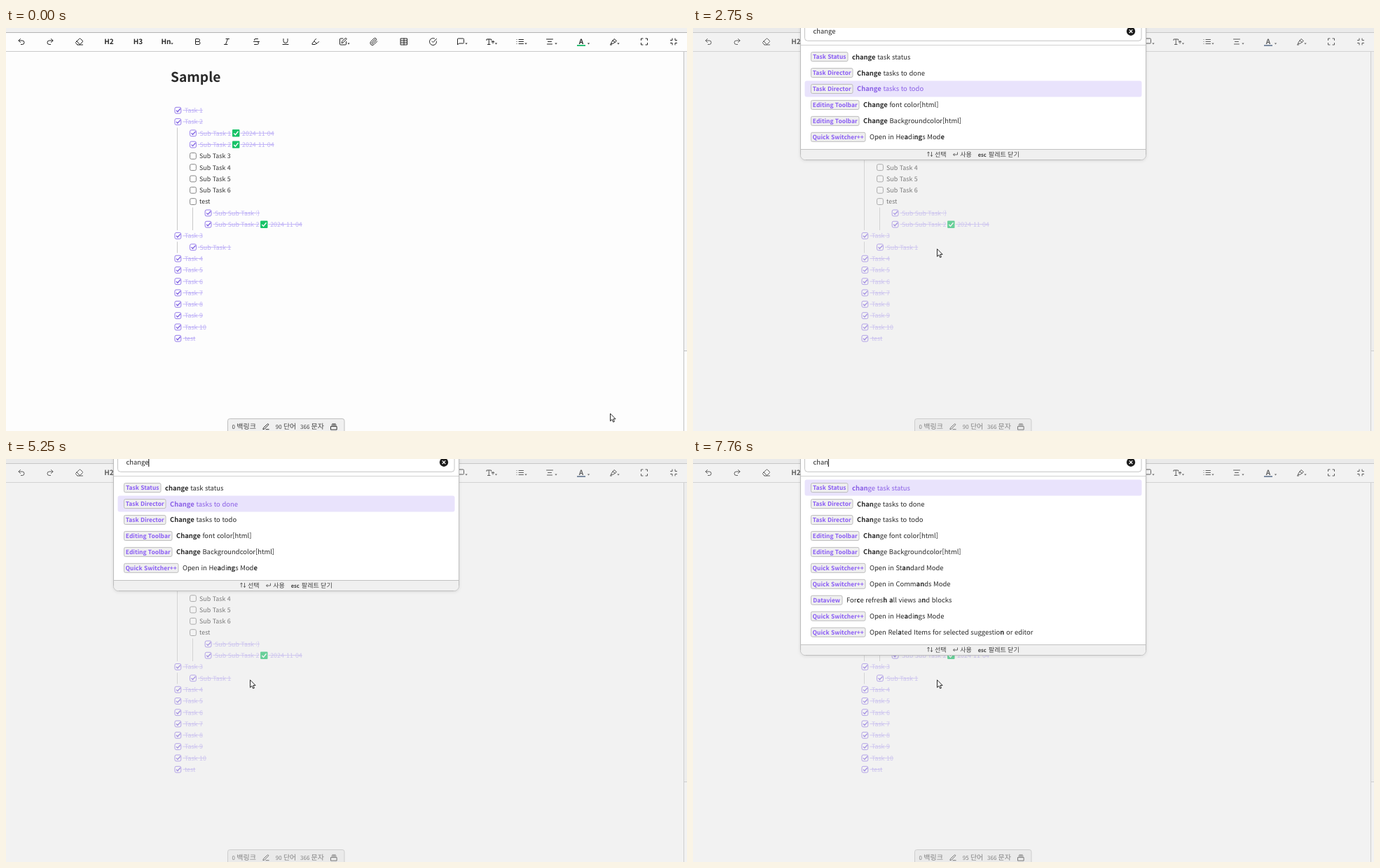
These frames come from a looping animation (972x576 px, 8 s). An HTML page:

```html
<!DOCTYPE html>
<html lang="ko">
<head>
<meta charset="utf-8">
<title>Command palette</title>
<style>
html, body { margin: 0; width: 100%; height: 100%; overflow: hidden; background: #fdfdfd; }
svg { display: block; }
text { font: 9.43px "Noto Sans CJK KR", "Noto Sans CJK JP", "Noto Sans", sans-serif; fill: #2a2a2a; white-space: pre; text-rendering: geometricPrecision; }
.ko { font-size: 11.45px; }
.b { font-weight: 700; }
.mid { text-anchor: middle; }
.icon { fill: none; stroke: #222; stroke-width: 2; stroke-linecap: round; stroke-linejoin: round; }
.tri { fill: #333; }
#tools text { font-size: 10px; font-weight: 700; }
#tools.dim { opacity: .72; }
.tint { stroke: #14b866; stroke-width: 1.8; }
.dim .tint { stroke: #3d5578; }
text.title { font-size: 19.2px; font-weight: 700; }
text.task { font-size: 8.9px; fill: #333; }
text.done { fill: #bcaef6; text-decoration: line-through; }
.box { fill: #fff; stroke: #858585; }
.box.on { stroke: #9379ea; }
.tick { fill: none; stroke: #7b5ce0; stroke-width: 1.3; }
.guide { stroke: #c9c9c9; }
text.stat { font-size: 8px; fill: #444; }
.stat .ko { font-size: 10px; }
.panel { fill: #fff; stroke: #bdbdbd; filter: drop-shadow(0 1px 2px rgba(0, 0, 0, .1)); }
.hl { fill: #e9e3fc; }
text.sel { fill: #8a5fe6; }
.tag { fill: #efefef; stroke: #bdbdbd; }
text.tagname { font-size: 8.45px; font-weight: 700; fill: #8a5cf5; }
.key { fill: #e8e2fc; stroke: #a792ef; }
text.keyname { font-size: 7.7px; fill: #7355d8; stroke: #7355d8; stroke-width: .15px; }
text.hint { font-size: 7.6px; fill: #444; }
.hint .ko { font-size: 9.1px; }
text.ghost { fill: #777; }
</style>
</head>
<body>
<svg width="972" height="576" viewBox="0 0 972 576">
  <defs><clipPath id="list"><rect x="154" y="24" width="492" height="411"/></clipPath></defs>
  <rect width="972" height="576" fill="#fdfdfd"/>
  <rect width="972" height="6" fill="#f0f0f0"/>
  <path d="M0 6.5H972" stroke="#b4b4b4"/>
  <path d="M0 33.5H972" stroke="#c9c9c9"/>
  <rect x="968" y="34" width="4" height="427" fill="#f4f4f4"/>
  <path d="M967.5 34V576M967 461.5h5" stroke="#c0c0c0" fill="none"/>
  <g id="doc"></g>
  <path id="caret" d="M319.5 307v14" stroke="#111"/>
  <rect id="cover" width="972" height="576" fill="#e2e2e2" opacity=".4"/>
  <g id="tools"></g>
  <g id="palette"></g>
  <path id="typing" stroke="#111"/>
  <path id="arrow" d="M0 0V10.8L2.5 8.5 4.2 12.2 5.9 11.5 4.3 7.8H7.6Z" fill="#fff" stroke="#111" stroke-width=".9"/>
  <path id="beam" d="M347 310.5h5M347 321.5h5M349.5 310.5v11" fill="none" stroke="#222"/>
</svg>
<script>
const $ = id => document.getElementById(id);
const rich = s => s.replace(/[가-힣]+/g, '<tspan class="ko">$&</tspan>')
  .replace(/\*(.+?)\*/g, '<tspan class="b">$1</tspan>');
const text = (x, y, s, cls = '') => `<text x="${x}" y="${y}" class="${cls}">${rich(s)}</text>`;
const rect = (x, y, w, h, cls, r = 2) =>
  `<rect x="${x}" y="${y}" width="${w}" height="${h}" rx="${r}" class="${cls}"/>`;
const icon = (x, y, d, k = .5) =>
  `<path class="icon" transform="translate(${x - 12 * k} ${y - 12 * k}) scale(${k})" d="${d}"/>`;

// Toolbar
const marker = 'M9 11l-6 6v3h9l3-3M22 12l-4.6 4.6a2 2 0 0 1-2.8 0l-5.2-5.2a2 2 0 0 1 0-2.8L14 4';
const tools = [
  [22, 'M9 14 4 9l5-5M4 9h10.5a5.5 5.5 0 0 1 0 11H11'],
  [63, 'M15 14l5-5-5-5M20 9H9.5a5.5 5.5 0 0 0 0 11H13'],
  [104.5, 'M7 21l-4.3-4.3c-1-1-1-2.5 0-3.4l9.6-9.6c1-1 2.5-1 3.4 0l5.6 5.6c1 1 1 2.5 0 3.4L13 21M22 21H7M5 11l9 9'],
  [273.5, 'M6 12h9a4 4 0 0 1 0 8H7a1 1 0 0 1-1-1V5a1 1 0 0 1 1-1h7a4 4 0 0 1 0 8'],
  [315, 'M19 4h-9M14 20H5M15 4 9 20'],
  [357.5, 'M16 4H9a3 3 0 0 0-2.8 4M14 12a4 4 0 0 1 0 8H6M4 12h16'],
  [399, 'M6 4v6a6 6 0 0 0 12 0V4M4 20h16'],
  [441.5, marker],
  [481, 'M12 3H5a2 2 0 0 0-2 2v14a2 2 0 0 0 2 2h14a2 2 0 0 0 2-2v-7M18.4 2.6a2.1 2.1 0 0 1 3 3L12 15l-4 1 1-4Z'],
  [525, 'M21.4 11l-9.2 9.2a6 6 0 0 1-8.5-8.5l8.6-8.6a4 4 0 1 1 5.7 5.7l-8.6 8.5a2 2 0 0 1-2.8-2.8l8.5-8.5'],
  [568, 'M3 3h18v18H3ZM3 9h18M3 15h18M12 3v18'],
  [609.5, 'M22 11v1a10 10 0 1 1-6-9.1M22 4 12 14l-3-3'],
  [649, 'M21 15a2 2 0 0 1-2 2H7l-4 4V5a2 2 0 0 1 2-2h14a2 2 0 0 1 2 2z'],
  [691, 'M2 8V5h13v3M8.5 5v15M5 20h7M17 13v-2h6v2M20 11v6'],
  [733.5, 'M9 6h13M9 12h13M9 18h13M3 6h.01M3 12h.01M3 18h.01'],
  [776, 'M21 5H3M17 12H7M19 19H5'],
  [867, 'M4 20l3-7L14 4l7 6-9 7-5 1M10 9l7 5M3 21h4'],
  [911, 'M8 3H3v5M21 8V3h-5M3 16v5h5M16 21h5v-5'],
  [953, 'M8 3v5H3M21 8h-5V3M3 16h5v5M16 21v-5h5']
];
$('tools').innerHTML = tools.map(([x, d]) => icon(x, 19.5, d)).join('') +
  text(147, 23.3, 'H2', 'mid') + text(188.5, 23.3, 'H3', 'mid') + text(228.5, 23.3, 'Hn', 'mid') +
  text(821, 22.5, 'A', 'mid') + '<path class="tint" d="M815 25h12"/>' +
  [237, 489, 657, 699.5, 742, 785, 831.5, 874].map(x => `<path class="tri" d="M${x - 1.7} 21.5h3.4l-1.7 2z"/>`).join('');

// Document
const tasks = ('Task 1|Task 2|>Sub Task 1+|>Sub Task 2+|>Sub Task 3|>Sub Task 4|>Sub Task 5|>Sub Task 6|>test|' +
  '>>Sub Sub Task :)|>>Sub Sub Task 2+|Task 3|>Sub Task 1|Task 4|Task 5|Task 6|Task 7|Task 8|Task 9|Task 10|test').split('|');

function taskRow(raw, i, allDone) {
  const level = raw.lastIndexOf('>') + 1, name = raw.replace(/[>+]/g, '');
  const cx = 245.4 + 21.6 * level, cy = 117.7 + 16.3 * i, x = cx + 9;
  const done = allDone || i < 4 || i > 8, base = cy + 3.3;
  let out = rect(cx - 4.4, cy - 4.4, 8.8, 8.8, done ? 'box on' : 'box');
  if (!done) return out + text(x, base, name, 'task');
  out += `<path class="tick" d="M${cx - 2.4} ${cy}l1.9 2 4-4.4"/>` + text(x - 2, base, '\u00a0' + name, 'task done');
  if (raw.endsWith('+')) {
    const ex = x + (level > 1 ? 70.7 : 52.2);
    out += `<rect x="${ex - 5.2}" y="${cy - 5.2}" width="10.4" height="10.4" rx="1" fill="#17c368"/>` +
      `<path d="M${ex - 3} ${cy + .3}l2.2 2.2 4-5" fill="none" stroke="#fff" stroke-width="1.4"/>` +
      text(ex + 6.4, base, '\u00a02024-11-04', 'task done');
  }
  return out;
}

function page(allDone, words) {
  return text(235, 77.2, 'Sample', 'title') +
    '<path class="guide" d="M244.5 142.5V289M266.5 256.5V289M244.5 305.5V321.5"/>' +
    tasks.map((s, i) => taskRow(s, i, allDone)).join('') +
    '<rect x="316.5" y="558.5" width="166.5" height="24" rx="3" fill="#f0f0f0" stroke="#bfbfbf"/>' +
    text(322.6, 573, '0 백링크', 'stat') + text(384.8, 573, words + ' 단어', 'stat') + text(420, 573, '366 문자', 'stat') +
    icon(371, 570, 'M12 20h9M16.5 3.5a2.1 2.1 0 0 1 3 3L7 19l-4 1 1-4Z', .46) +
    icon(468, 570, 'M7 3h10M5 7h14M3 11h18v10H3Z', .46);
}

// Palette: rows are "plugin|label|shortcuts", with *matched* letters
const tagWidth = { 'Task Status': 53, 'Task Director': 60, 'Editing Toolbar': 69, 'Omnisearch': 56, 'Reminder': 47, 'Dataview': 45, 'Quick Switcher++': 78 };
const keyWidth = { 'F2': 19, 'Ctrl + Tab': 45, 'Ctrl + Page Down': 72, 'Ctrl + Shift + Tab': 70, 'Ctrl + Page Up': 61, 'Ctrl + W': 38, 'Win + Shift + Enter': 77 };
const QS = 'Quick Switcher++|Open ';
const commands = ['|현재 파일 저장|Ctrl + S', '|고정핀 켜기/끄기', '|오른쪽 분할', '|아래쪽 분할', '|스탭 탭 전환',
  '|파일 제목 편집|F2', '|파일 경로 복사', '|Feldovan URI 복사', '|PDF로 내보내기', '|현재 탭을 새 창에서 열기',
  '|현재 탭을 새 창으로 이동', '|Go to next tab|Ctrl + Page Down,Ctrl + Tab', '|Go to tab #1|Ctrl + 1',
  '|Go to last tab|Ctrl + 9', '|Go to previous tab|Ctrl + Page Up,Ctrl + Shift + Tab', '|새 탭|Ctrl + T', '|활성 탭 닫기|Ctrl + W'];
const best = ['Task Status|change task status', 'Task Director|Change tasks to done', 'Task Director|Change tasks to todo',
  'Editing Toolbar|Change font color[html]', 'Editing Toolbar|Change Backgroundcolor[html]'];
const cha = ['Omnisearch|V*a*ult search', 'Reminder|Toggle *ch*ecklist st*a*tus|Win + Shift + Enter',
  'Editing Toolbar|Toggle *ch*ecklist st*a*tus', 'Omnisearch|In-file se*a*rch', '|*C*lose t*h*is t*a*b group',
  'Dataview|For*c*e refres*h* *a*ll views and blocks', 'Task Director|S*h*ow p*a*ge todo summary',
  'Dataview|Drop all *c*ac*h*ed file met*a*data', QS + 'Rel*a*ted Items for the active editor',
  QS + 'Rel*a*ted Items for selected suggestion or editor', QS + 'in V*a*ults Mode', QS + 'in St*a*ndard Mode', QS + 'in He*a*dings Mode'];
const others = {
  ch: cha.map(s => s.replace(/\*a\*/g, 'a')),
  cha,
  chan: [QS + 'in St*an*dard Mode', QS + 'in Comm*an*ds Mode', 'Dataview|For*c*e refres*h* *a*ll views a*n*d blocks',
    QS + 'in He*a*di*n*gs Mode', QS + 'Rel*a*ted Items for selected suggestio*n* or editor'],
  chang: [QS + 'in He*a*di*ng*s Mode'],
  change: [QS + 'in He*a*di*ng*s Mod*e*']
};
const thumbEnd = { '': 95, ch: 300, cha: 350 };
const caretX = [171.5, 176.5, 182, 187.5, 193.3, 198.6, 203.8];

function rowsFor(q) {
  if (!q) return commands;
  const mark = s => s.replace(new RegExp('\\|(' + q + ')', 'i'), '|*$1*');
  return best.map(mark).concat(others[q]);
}

function palette(q, sel) {
  const thumb = thumbEnd[q];
  let y = 29.6, rows = '';
  rowsFor(q).forEach((row, i) => {
    const [tag, label, keys] = row.split('|'), h = keys ? 25.8 : 22.95, cy = y + h / 2;
    let x = 168, right = 623;
    if (i === sel) rows += rect(159.5, y, thumb ? 472.5 : 481, h, 'hl', 3);
    if (tag) {
      const w = tagWidth[tag];
      rows += rect(168.5, cy - 6.5, w - .5, 13, 'tag') + text(168 + w / 2 + .2, cy + 3.1, tag, 'tagname mid');
      x += w + 6;
    }
    rows += text(x, cy + 3.5, label, i === sel ? 'sel' : '');
    for (const key of keys ? keys.split(',') : []) {
      const w = keyWidth[key] || 36;
      rows += rect(right - w + .5, cy - 7.4, w - 1, 15.4, 'key') + text(right - w / 2, cy + 3, key, 'keyname mid');
      right -= w + 6;
    }
    y += h;
  });
  const foot = Math.min(435.5, Math.round(y + 6) + .5), base = foot + 10;
  return rect(153.5, -20, 493, foot + 35, 'panel', 7) +
    '<rect x="159.5" y="-20" width="480.5" height="38.3" rx="4" fill="#fff" stroke="#c4c4c4"/>' +
    '<path d="M154 24.5H646" stroke="#d2d2d2"/>' +
    (q ? text(171.5, 8, q) : text(171.5, 8, '명령 입력...', 'ghost')) +
    '<circle cx="625" cy="4.7" r="6.2" fill="#1c1c1c"/><path d="M622.7 2.4l4.6 4.6m0-4.6l-4.6 4.6" stroke="#fff" stroke-width="1.2"/>' +
    `<g clip-path="url(#list)">${rows}</g>` +
    (thumb ? `<rect x="637.5" y="24.5" width="8.5" height="${thumb - 24}" fill="#f1f1f1" stroke="#bcbcbc"/>` : '') +
    `<path d="M154 ${foot}H646V${foot + 8}a6.5 6.5 0 0 1-6.5 6.5H160.5a6.5 6.5 0 0 1-6.5-6.5Z" fill="#f0f0f0"/>` +
    `<path d="M154 ${foot}H646" stroke="#c2c2c2"/>` +
    `<path d="M336 ${base}v-6.5m-1.5 1.8l1.5-1.8 1.5 1.8M340.5 ${base - 6.5}v6.5m-1.5-1.8l1.5 1.8 1.5-1.8` +
    `M377.5 ${base - 6}v3.5h-6m2-2l-2 2 2 2" fill="none" stroke="#444" stroke-width=".8"/>` +
    text(345, base, '선택', 'hint') + text(381.2, base, '사용', 'hint') + text(406.7, base, '*esc*', 'hint') + text(421.8, base, '팔레트 닫기', 'hint');
}

// Timeline, in ms
const LOOP = 8000;
const views = [[0], [1240, '', 0], [1500, 'ch', 0], [1750, 'cha', 0], [1990, 'chang', 0], [2250, 'change', 0],
  [2750, 'change', 2], [2990, 'change', 3], [3240, 'change', 2], [4510, 'change', 1], [5500],
  [7270, '', 0], [7510, 'ch', 0], [7760, 'chan', 0]];
const within = (t, ...spans) => spans.some(([a, b]) => t >= a && t < b);
const show = (id, on) => { $(id).style.display = on ? '' : 'none'; };
const cache = {};
function put(id, key, make) {
  if (cache[id] === key) return;
  cache[id] = key;
  $(id).innerHTML = make();
}

function draw(t) {
  const view = views.filter(v => v[0] <= t).pop(), [, q, sel] = view, open = q !== undefined;
  const done = t >= 5500, words = t >= 5760 ? 95 : 90;
  put('doc', done + ' ' + words, () => page(done, words));
  put('palette', view, () => open ? palette(q, sel) : '');
  show('cover', open);
  $('tools').setAttribute('class', open ? 'dim' : '');
  show('caret', within(t, [480, 990], [5500, 6250], [6760, 7270]));
  show('typing', open && !within(t, [2750, 3240], [3750, 4260], [4760, 5250]));
  if (open) $('typing').setAttribute('d', `M${caretX[q.length]} 0v11`);
  const beam = !open && t >= 480;
  show('beam', beam);
  show('arrow', !beam);
  const tip = t < 250 ? '862.5 551' : t < 480 ? '350.5 313.5' : '348.5 315.8';
  $('arrow').setAttribute('transform', `translate(${tip})`);
}

const start = performance.now();
function tick() {
  draw((performance.now() - start) % LOOP);
  requestAnimationFrame(tick);
}
tick();
</script>
</body>
</html>
```
